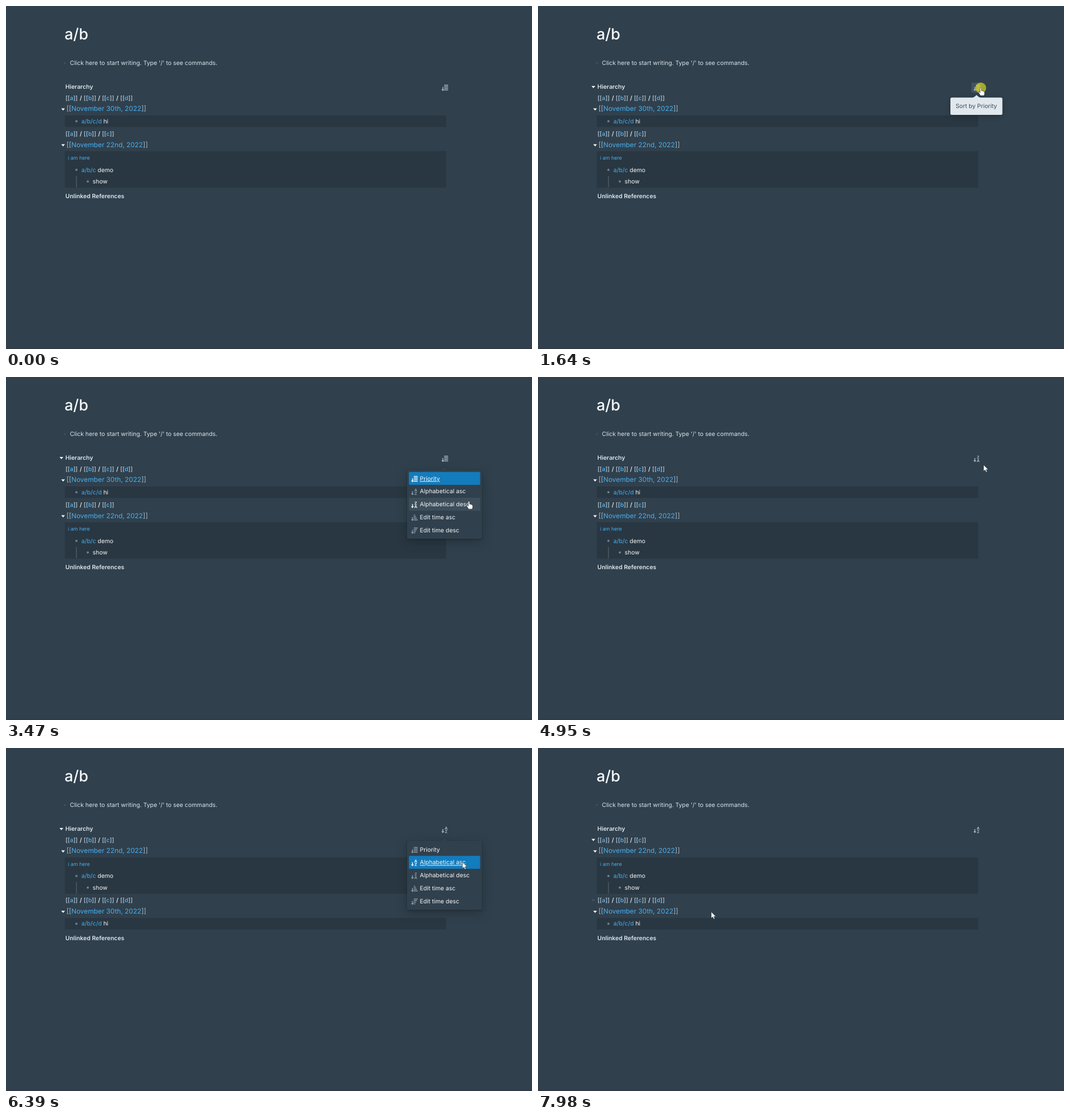
These frames come from a looping animation (926x605 px, 8000 ms). An HTML page:

```html
<!DOCTYPE html>
<html lang="en">
<head>
<meta charset="utf-8">
<title>Sortable hierarchy</title>
<style>
  html, body { margin: 0; width: 100%; height: 100%; overflow: hidden; background: #30404d; }
  svg { display: block; width: 100%; height: 100%; }
  text { font: 400 10.4px Inter, sans-serif; fill: #f5f8fa; white-space: pre; text-rendering: geometricPrecision; }
  .title { font-size: 27px; font-weight: 500; }
  .hint { fill: #dde5ea; }
  .strong { font-weight: 600; fill: #dfe7ec; }
  .date { font-size: 11.85px; }
  .small { font-size: 8.9px; }
  .link { fill: #48aff0; }
  .bracket { fill: #a7b6c2; }
  .tip { fill: #394b59; font-size: 10.3px; }
  .block { fill: #293742; }
  .bullet { fill: #6c7f8d; }
  #menu { filter: drop-shadow(0 1px 1px rgba(16,22,26,.4)) drop-shadow(0 5px 9px rgba(16,22,26,.35)); }
  #tooltip { filter: drop-shadow(0 2px 5px rgba(16,22,26,.4)); }
</style>
</head>
<body>
<svg id="stage" viewBox="0 0 926 605"></svg>
<script>
const LOOP = 8000;
const stage = document.getElementById('stage');

function add(parent, tag, attrs = {}, content) {
  const node = document.createElementNS('http://www.w3.org/2000/svg', tag);
  set(node, attrs);
  if (content !== undefined) node.textContent = content;
  parent.appendChild(node);
  return node;
}
function set(node, attrs) {
  for (const key in attrs) node.setAttribute(key, attrs[key]);
}
// runs: [text, class, x?] pieces of one line
function line(parent, x, y, cls, ...runs) {
  const node = add(parent, 'text', { x, y, class: cls });
  for (const [str, kind, left] of runs) {
    const span = add(node, 'tspan', { class: kind || '' }, str);
    if (left !== undefined) span.setAttribute('x', left);
  }
  return node;
}
const caret = (parent, x, y) =>
  add(parent, 'path', { d: `M${x - 3.3} ${y - 2}h6.6l-3.3 4z`, fill: '#f0f4f7' });
const bullet = (parent, cx, cy) => add(parent, 'circle', { cx, cy, r: 2, class: 'bullet' });

// ---- page -------------------------------------------------------------
add(stage, 'rect', { width: 926, height: 605, fill: '#30404d' });
add(stage, 'rect', { y: 603, width: 926, height: 2, fill: '#34394a' });
line(stage, 103, 59.4, 'title', ['a/b']);
add(stage, 'circle', { cx: 103.5, cy: 100.5, r: 2, fill: '#3c4c59' });
line(stage, 112.6, 104.2, 'hint', ["Click here to start writing. Type '/' to see commands."]);
line(stage, 104.5, 146.3, 'strong', ['Hierarchy']);
line(stage, 104.5, 339.4, 'strong', ['Unlinked References']);
const mainCaret = caret(stage, 97.5, 143);

function group(names, date, height) {
  const g = add(stage, 'g');
  const runs = [];
  [...names].forEach((name, i) => {
    const x = 104.7 + 32.1 * i;
    if (i) runs.push(['/', '', x - 7]);
    runs.push(['[[', 'bracket', x], [name, 'link'], [']]', 'bracket']);
  });
  line(g, 104.7, 165.6, 'strong', ...runs);
  const rowCaret = caret(g, 97.5, 162.2);
  caret(g, 100.5, 182.4);
  line(g, 106.4, 185.3, 'date', ['[[', 'bracket'], [date, 'link'], [']]', 'bracket']);
  add(g, 'rect', { x: 103.5, y: 193, width: 671.5, height, class: 'block' });
  return { g, rowCaret };
}

const deep = group('abcd', 'November 30th, 2022', 20.3);
bullet(deep.g, 124, 203.2);
line(deep.g, 132.8, 206.8, '', ['a/b/c/d', 'link'], [' hi']);

const shallow = group('abc', 'November 22nd, 2022', 64.2);
line(shallow.g, 109, 207.6, 'small', ['i am here', 'link']);
bullet(shallow.g, 124, 225.8);
line(shallow.g, 132.8, 229.4, '', ['a/b/c', 'link'], [' demo']);
add(shallow.g, 'rect', { x: 123.5, y: 236.5, width: 1, height: 20, fill: '#5c6d7a' });
bullet(shallow.g, 144, 246.3);
line(shallow.g, 152.6, 250, '', ['show']);

// ---- sort icons ---------------------------------------------------------
const OPTIONS = ['Priority', 'Alphabetical asc', 'Alphabetical desc', 'Edit time asc', 'Edit time desc'];
const BARS = { 0: [7, 7, 7, 7], 3: [2.5, 4, 5.5, 7], 4: [7, 5.5, 4, 2.5] };

function icon(parent, kind, x, y) {
  const g = add(parent, 'g', { transform: `translate(${x} ${y})` });
  add(g, 'path', { d: 'M2 5h1.5v4h1.9L2.75 12 .1 9H2z' });
  if (BARS[kind]) {
    BARS[kind].forEach((width, i) => add(g, 'rect', { x: 5, y: .9 + 2.8 * i, width, height: 1.5 }));
  } else {
    const letters = kind === 1 ? 'AZ' : 'ZA';
    [...letters].forEach((ch, i) => add(g, 'text', {
      x: 8.6, y: 5.6 + 6.3 * i, 'text-anchor': 'middle',
      style: 'font-size:7px;font-weight:700;fill:inherit'
    }, ch));
  }
  return g;
}

const button = add(stage, 'rect', { x: 763, y: 135, width: 18, height: 18, rx: 2, fill: '#8a9ba8' });
const buttonIcons = [0, 1, 2].map(kind => icon(stage, kind, 766.3, 138));
buttonIcons.forEach(node => set(node, { fill: '#a7b6c2' }));

// ---- tooltip and menu -----------------------------------------------------
const tooltip = add(stage, 'g', { id: 'tooltip' });
const tipBox = add(tooltip, 'rect', { y: 161.5, height: 30.5, rx: 2.5, fill: '#e1e8ed' });
add(tooltip, 'path', { d: 'M764 162.5Q768.5 161 772 157Q775.5 161 780 162.5z', fill: '#e1e8ed' });
const tipText = add(tooltip, 'text', { x: 771.7, y: 180.3, class: 'tip', 'text-anchor': 'middle' });

const ROW = 22.75, TOP = 167.5;
const menu = add(stage, 'g', { id: 'menu' });
add(menu, 'path', { d: 'M762 165Q768 163 772 157.5Q776 163 782 165z', fill: '#30404d' });
add(menu, 'rect', { x: 706, y: 164, width: 132, height: 121.5, rx: 2.5, fill: '#30404d' });
const items = OPTIONS.map((label, i) => {
  const y = TOP + ROW * i;
  return {
    back: add(menu, 'rect', { x: 709.3, y, width: 125.4, height: ROW, rx: 1.5 }),
    icon: icon(menu, i, 712.8, y + 6.3),
    label: line(menu, 728.6, y + 15.2, '', [label])
  };
});

// ---- pointer ------------------------------------------------------------
const pointer = add(stage, 'g', { stroke: '#2a3238', 'stroke-width': .6, 'stroke-linejoin': 'round', fill: '#fff' });
const flash = add(pointer, 'circle', { r: 9.5, fill: '#d6d41c', opacity: .7, stroke: 'none' });
const arrow = add(pointer, 'path', { d: 'M0 0V11.2L2.6 8.8L4.3 12.8L6.2 12L4.5 8.2H8z' });
const hand = add(pointer, 'path', {
  d: 'M-1.2 1Q-1.2-.3 0-.3Q1.1-.3 1.1 1V5Q3 4.3 3.3 5.6Q5 5 5.2 6.4Q6.6 6.2 6.6 7.8V10' +
     'Q6.6 12 5.4 13.6H-.6Q-1.6 11.4-4 8.6Q-4.2 7-2.6 7.4L-1.2 8.6z'
});

// ---- timeline: [start, end] spans in ms -----------------------------------
const PATH = [
  [0, 909, 615], [70, 907, 598], [300, 880, 440], [520, 838, 270], [700, 808, 190], [870, 797, 169],
  [940, 794, 163], [1080, 788.5, 151], [1270, 788.5, 151], [1420, 779.5, 144.5],
  [2500, 779.5, 144.5], [2760, 784, 170], [3000, 802, 195], [3270, 819, 211], [3470, 815, 219.3],
  [4520, 815, 219.3], [4750, 799, 185], [4950, 784.5, 155], [5020, 782, 153], [5160, 777.5, 149.5],
  [5560, 777.5, 149.5], [5700, 786, 168], [5850, 800, 187], [6050, 803.5, 201.3],
  [6480, 803.5, 201.3], [6660, 760, 175], [6830, 650, 148], [7090, 468, 146], [7230, 455, 168],
  [7620, 455, 168], [7800, 385, 220], [7980, 305, 289]
];
const CLICKS = [[1630, 1775], [4255, 4325], [5225, 5295], [6315, 6385]];
const HANDS = [[1330, 4330], [5060, 6350]];
const HOVERS = [[1290, 2570], [5060, 5640]];
const CARETS = [[1290, 2600], [2740, 4420], [5060, 6440], [6800, 7150]];
const TIPS = [[1490, 1790], [5170, 5340]];
const MENUS = [[1830, 4400], [5390, 6400]];
const MODES = [[0, 0], [4325, 2], [6360, 1]];

const clamp = v => Math.min(1, Math.max(0, v));
const inside = (t, spans) => spans.some(([a, b]) => t >= a && t < b);
const fade = (t, spans, ms = 100) =>
  Math.max(0, ...spans.map(([a, b]) => Math.min(clamp((t - a) / ms), 1 - clamp((t - b) / ms))));
const show = (node, on) => set(node, { visibility: on ? 'visible' : 'hidden' });
const scaleAt = (x, y, k) => `translate(${x} ${y}) scale(${k}) translate(${-x} ${-y})`;

function spring(x) {
  if (x <= 0 || x >= 1) return clamp(x);
  const bezier = (s, p, q) => 3 * s * (1 - s) ** 2 * p + 3 * s * s * (1 - s) * q + s ** 3;
  let lo = 0, hi = 1;
  for (let i = 0; i < 20; i++) {
    const mid = (lo + hi) / 2;
    if (bezier(mid, .54, .38) < x) lo = mid; else hi = mid;
  }
  return bezier(lo, 1.12, 1.11);
}

function pointerAt(t) {
  const next = PATH.findIndex(key => key[0] > t);
  if (next < 0) return PATH[PATH.length - 1].slice(1);
  const [t0, x0, y0] = PATH[next - 1], [t1, x1, y1] = PATH[next];
  const k = (t - t0) / (t1 - t0);
  return [x0 + (x1 - x0) * k, y0 + (y1 - y0) * k];
}

function drawMenu(t, mode, x, y) {
  const span = MENUS.find(([a, b]) => t >= a && t < b + 300);
  show(menu, span);
  if (!span) return;
  const [a, b] = span;
  const grow = t < b ? spring((t - a) / 300) : 1 - spring((t - b) / 300);
  set(menu, { transform: scaleAt(772, 160.5, .3 + .7 * grow), opacity: fade(t, [span]) });
  const over = x > 709 && x < 835 ? Math.floor((y - TOP) / ROW) : -1;
  const chosen = MODES.some(([start]) => start > a && start <= t);
  items.forEach((item, i) => {
    const active = i === mode, hover = i === over;
    set(item.back, {
      fill: active ? '#137cbd' : '#8a9ba8',
      'fill-opacity': active ? 1 : hover ? .15 : 0
    });
    set(item.icon, { fill: active || hover ? '#f5f8fa' : '#8a9ba8' });
    set(item.label, { 'text-decoration': i === (chosen ? mode : 0) ? 'underline' : 'none' });
  });
}

function draw(t) {
  const [x, y] = pointerAt(t);
  const mode = MODES.filter(([start]) => start <= t).pop()[1];

  const ascending = mode === 1;
  set(deep.g, { transform: `translate(0 ${ascending ? 106.7 : 0})` });
  set(shallow.g, { transform: `translate(0 ${ascending ? 0 : 63.3})` });
  set(mainCaret, { opacity: fade(t, CARETS) });
  set(shallow.rowCaret, { opacity: fade(t, [[7150, LOOP]]) });
  set(deep.rowCaret, { opacity: fade(t, [[7970, LOOP]]) });

  buttonIcons.forEach((node, i) => show(node, i === mode));
  set(button, { opacity: inside(t, HOVERS) ? .22 : 0 });

  const tip = fade(t, TIPS);
  const width = mode ? 142 : 91.5;
  set(tooltip, { opacity: tip, transform: scaleAt(772, 157, .8 + .2 * tip) });
  set(tipBox, { x: 771.8 - width / 2, width });
  tipText.textContent = 'Sort by ' + OPTIONS[mode];

  drawMenu(t, mode, x, y);

  set(pointer, { transform: `translate(${x} ${y})` });
  const pointing = inside(t, HANDS);
  show(hand, pointing);
  show(arrow, !pointing);
  show(flash, inside(t, CLICKS));
}

const begin = performance.now();
function tick() {
  draw((performance.now() - begin) % LOOP);
  requestAnimationFrame(tick);
}
tick();
</script>
</body>
</html>
```
